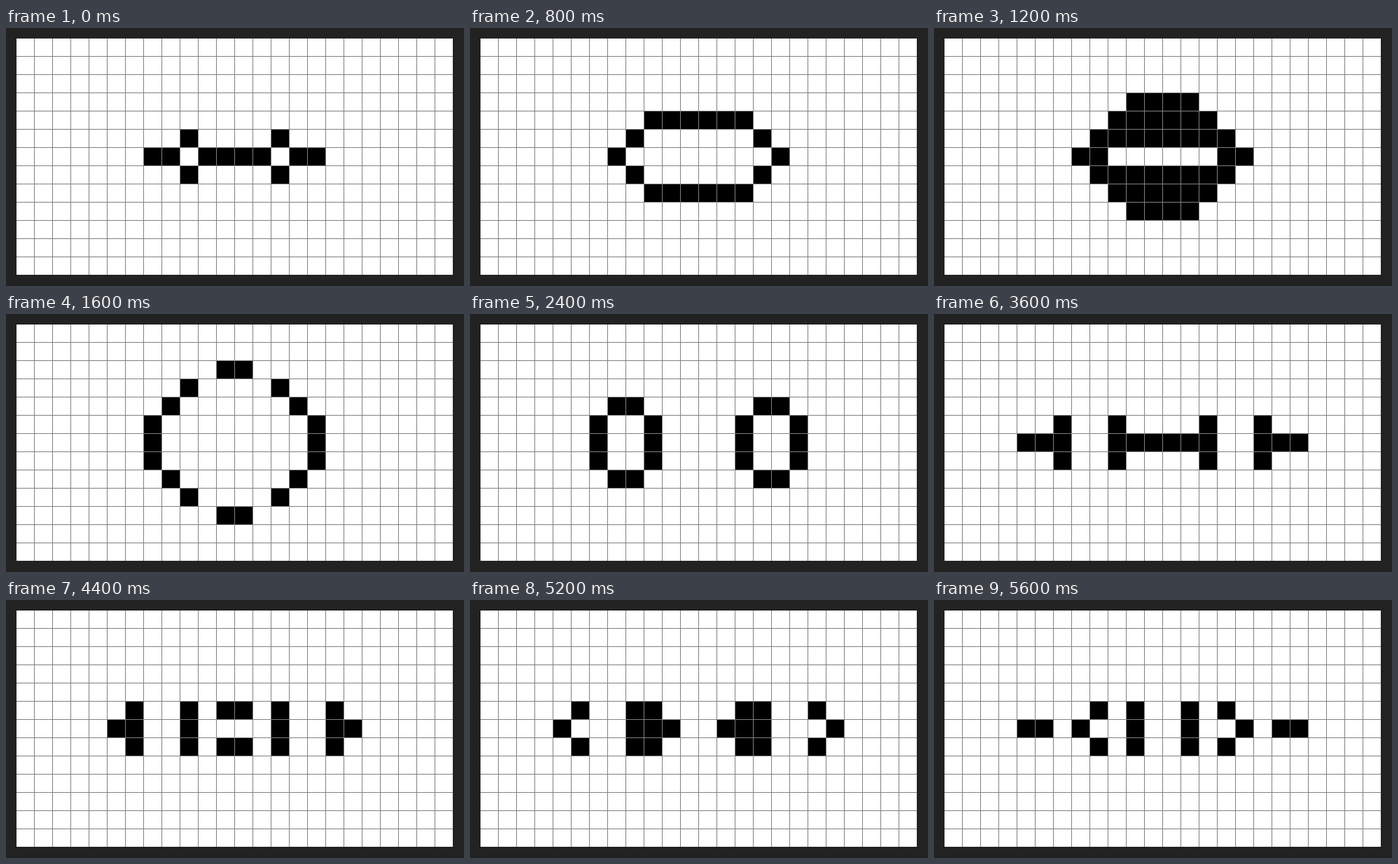
Recreate the animation shown at these times as an HTML page with a canvas. Size 654 px wide and 368 px high, loop 6000 ms.

```html
<!DOCTYPE html>
<html lang="en">
<head>
<meta charset="utf-8">
<title>Game of Life</title>
<style>
html, body { margin: 0; width: 100%; height: 100%; overflow: hidden; background: #222; }
canvas { display: block; }
</style>
</head>
<body>
<canvas id="stage" width="654" height="368"></canvas>
<script>
const COLS = 24, ROWS = 13, PITCH = 26, CELL = 25, EDGE = 15;
const STEP = 400, PERIOD = 15;
const SEED = ["..#....#..", "##.####.##", "..#....#.."];
const SEED_COL = 7, SEED_ROW = 5;

const ctx = document.getElementById("stage").getContext("2d");

function makeGrid(rule) {
  return Array.from({ length: ROWS }, (_, r) =>
    Array.from({ length: COLS }, (_, c) => rule(r, c)));
}

function neighbours(grid, r, c) {
  let n = 0;
  for (let y = r - 1; y <= r + 1; y++)
    for (let x = c - 1; x <= c + 1; x++)
      if ((y !== r || x !== c) && grid[y]?.[x]) n++;
  return n;
}

function evolve(grid) {
  return makeGrid((r, c) => {
    const n = neighbours(grid, r, c);
    return n === 3 || (n === 2 && grid[r][c]);
  });
}

const generations = [makeGrid((r, c) => SEED[r - SEED_ROW]?.[c - SEED_COL] === "#")];
while (generations.length < PERIOD) generations.push(evolve(generations.at(-1)));

function draw(grid) {
  ctx.fillStyle = "#222";
  ctx.fillRect(0, 0, 654, 368);
  ctx.fillStyle = "#808080";
  ctx.fillRect(EDGE, EDGE, COLS * PITCH - 1, ROWS * PITCH - 1);
  grid.forEach((row, r) => row.forEach((alive, c) => {
    ctx.fillStyle = alive ? "#000" : "#fff";
    ctx.fillRect(EDGE + c * PITCH, EDGE + r * PITCH, CELL, CELL);
  }));
}

const start = performance.now();
let shown = -1;

function tick() {
  const index = Math.floor((performance.now() - start) / STEP) % PERIOD;
  if (index !== shown) draw(generations[shown = index]);
  requestAnimationFrame(tick);
}
tick();
</script>
</body>
</html>
```
